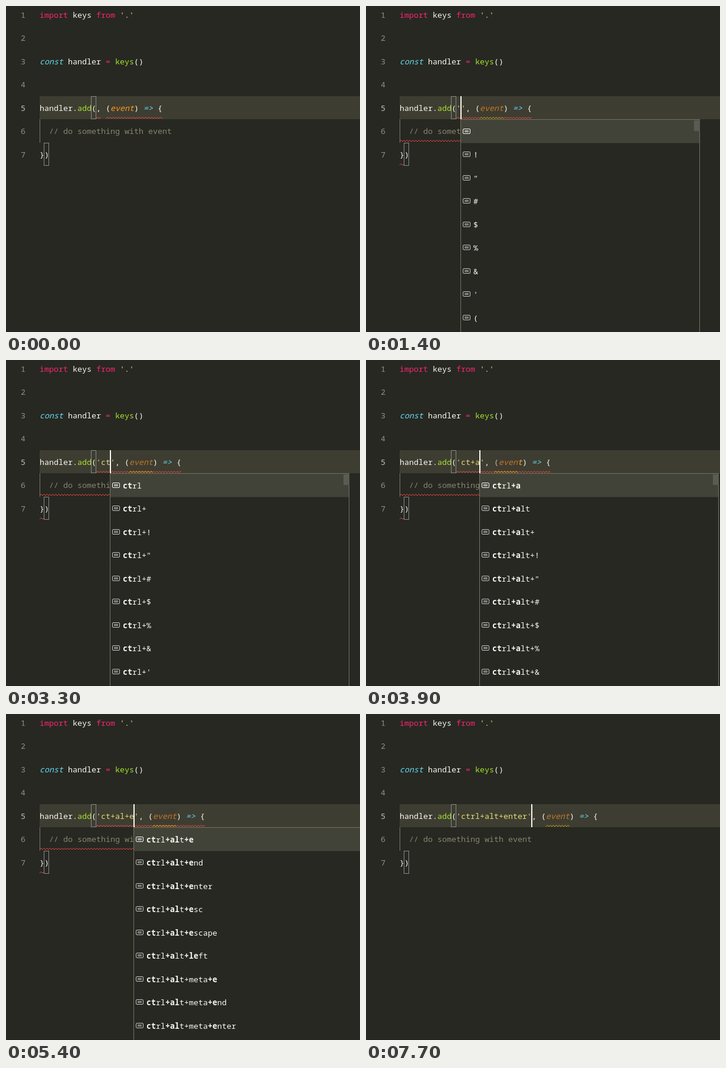
An HTML page with a canvas for the animation above (8 s loop, 600 px wide and 553 px high).

```html
<!DOCTYPE html>
<html lang="en">
<head>
<meta charset="utf-8">
<title>Typing with completions</title>
<style>
  html, body { margin: 0; height: 100%; overflow: hidden; background: #272822; }
  canvas { display: block; }
</style>
</head>
<body>
<canvas id="stage" width="600" height="553"></canvas>
<script>
const ctx = document.getElementById('stage').getContext('2d');
const LOOP = 8000, LEFT = 57, CHAR = 8, LINE = 39.5;
const FONT = '13.333px "Noto Sans Mono", monospace';
const BG = '#272822', ACTIVE = '#3e3d32', WHITE = '#f8f8f2', PINK = '#f92672', YELLOW = '#e6db74',
      GREEN = '#a6e22e', CYAN = '#66d9ef', ORANGE = '#fd971f', GREY = '#88846f',
      RED = '#f04a42', WARN = '#cca700';

// Asterisks toggle bold in completion labels.
const SYMBOLS = [...'!"#$%&\'('];
const complete = (prefix, endings) => endings.map(ending => prefix + ending);
const withSymbols = sep => SYMBOLS.map(s => sep + s);

const STATES = [
  { at: 0, key: null },
  { at: 400, key: '' },
  { at: 500, key: '', items: ['', ...SYMBOLS] },
  { at: 1900, key: 'c', items: complete('*c*', ['', 'apslock', 'lear', 'trl', 'trl+', ...withSymbols('trl+')]) },
  { at: 2300, key: 'ct', items: complete('*ct*rl', ['', '+', ...withSymbols('+')]) },
  { at: 3500, key: 'ct+', items: complete('*ct*rl*+*', ['', ...SYMBOLS]) },
  { at: 3800, key: 'ct+a', items: complete('*ct*rl*+a*', ['', 'lt', 'lt+', ...withSymbols('lt+')]) },
  { at: 4100, key: 'ct+al', items: complete('*ct*rl*+al*t', ['', '+', ...withSymbols('+')]) },
  { at: 4700, key: 'ct+al+', items: complete('*ct*rl*+al*t*+*', ['', ...SYMBOLS]) },
  { at: 5400, key: 'ct+al+e', items: [
    ...complete('*ct*rl*+al*t*+e*', ['', 'nd', 'nter', 'sc', 'scape']),
    '*ct*rl*+a*lt*+le*ft',
    ...complete('*ct*rl*+al*t+meta*+e*', ['', 'nd', 'nter'])] },
  { at: 5700, key: 'ct+al+en', items: [
    ...['', '+meta', '+shift', '+meta+shift'].flatMap(mod =>
      complete(`*ct*rl*+al*t${mod}*+en*`, ['d', 'ter'])),
    '*ct*rl*+al*t+m*e*ta*+n*'] },
  { at: 6900, key: 'ctrl+alt+enter' }
];
const CARET_OFF = [[0, 100], [900, 1300], [2700, 3300], [5100, 5400], [6200, 6700], [7350, 7700]];

const colX = col => LEFT + col * CHAR;
const lineTop = line => 153 + (line - 5) * LINE;

function box(color, x, y, w, h) {
  ctx.fillStyle = color;
  ctx.fillRect(x, y, w, h);
}

function text(str, x, baseline, color, style = '') {
  ctx.font = `${style} ${FONT}`;
  ctx.fillStyle = color;
  ctx.fillText(str, x, Math.floor(baseline));
}

// Parts are [string, color, style] runs laid out on the character grid.
function codeLine(line, parts) {
  let col = 0;
  for (const [str, color = WHITE, style] of parts) {
    text(str, colX(col), lineTop(line) + 25, color, style);
    col += str.length;
  }
}

function squiggle(line, col, length, color) {
  const x0 = colX(col), x1 = colX(col + length), y = Math.floor(lineTop(line)) + 36.8;
  ctx.save();
  ctx.beginPath();
  ctx.rect(x0, y - 3, x1 - x0, 6);
  ctx.clip();
  ctx.beginPath();
  for (let x = x0, up = 1; x <= x1 + 3; x += 2.5, up = -up) ctx.lineTo(x, y + up * 1.2);
  ctx.strokeStyle = color;
  ctx.lineWidth = 1;
  ctx.stroke();
  ctx.restore();
}

function bracketBox(line, col) {
  ctx.strokeStyle = '#888';
  ctx.lineWidth = 1;
  ctx.strokeRect(colX(col) - 0.5, Math.floor(lineTop(line)) + 0.5, CHAR, 38);
}

function icon(x, y, color) {
  ctx.strokeStyle = color;
  ctx.lineWidth = 1;
  ctx.beginPath();
  ctx.roundRect(x + 0.5, y + 0.5, 12, 8, 1.5);
  ctx.stroke();
  box(color, x + 3, y + 3, 7, 1);
  box(color, x + 3, y + 5, 7, 1);
}

function popup(x, items, selected) {
  const border = '#75715e';
  box(BG, x - 1, 192, 406, 361);
  box('#414339', x, 193 + selected * LINE, 405, LINE);
  box(border, x - 1, 192, 406, 1);
  box(border, x - 1, 192, 1, 361);
  box(border, x + 404, 192, 1, 361);
  box('#5a5b53', x + 395, 194, 10, 18);
  items.slice(0, 9).forEach((item, i) => {
    const y = 193 + i * LINE;
    icon(x + 3, Math.floor(y + 15), i === selected ? '#fff' : '#c5c5c5');
    let labelX = x + 21;
    item.split('*').forEach((run, j) => {
      text(run, labelX, y + 25, WHITE, j % 2 ? 'bold' : '');
      labelX += run.length * CHAR;
    });
  });
}

function draw(t) {
  const { key, items } = STATES.findLast(s => s.at <= t);
  const quoted = key === null ? '' : `'${key}'`;
  const after = 12 + quoted.length;
  const eventCol = after + 3;

  box(BG, 0, 0, 600, 553);
  box('#211f1c', 0, 552, 600, 1);
  box(ACTIVE, LEFT, 153, 543, 39);
  for (let n = 1; n <= 7; n++) text(n, 25, lineTop(n) + 25, n === 5 ? '#c2c2bf' : '#90908a');

  codeLine(1, [['import', PINK], [' keys '], ['from', PINK], [" '.'", YELLOW]]);
  codeLine(3, [['const', CYAN, 'italic'], [' handler '], ['= ', PINK], ['keys', GREEN], ['()']]);
  codeLine(5, [['handler.'], ['add', GREEN], ['('], [quoted, YELLOW], [', ('],
    ['event', ORANGE, 'italic'], [') '], ['=>', CYAN, 'italic'], [' {']]);
  codeLine(6, [['  // do something with event', GREY]]);
  codeLine(7, [['})']]);

  box('#767771', LEFT, 192, 1, 40);
  bracketBox(5, 11);
  bracketBox(7, 1);

  if (t < 600) {
    squiggle(5, after, 1, RED);
    squiggle(5, after + 2, 12, RED);
  } else if (t < 7300) {
    squiggle(5, 12, quoted.length + 14, RED);
    squiggle(6, 0, 28, RED);
    squiggle(7, 0, 1, RED);
  }
  if (t >= 700) {
    // The unused-variable hint trails one keystroke behind for a moment.
    const hintCol = eventCol - (t >= 3800 && t < 4100 ? 1 : 0);
    ctx.globalAlpha = 0.34;
    box(ACTIVE, colX(hintCol), 160, 5 * CHAR, 25);
    ctx.globalAlpha = 1;
    squiggle(5, hintCol, 5, WARN);
  }

  const caretCol = key === null ? 12 : after - (t < 6900 ? 1 : 0);
  if (items) popup(colX(caretCol), items, t >= 6500 ? 1 : 0);
  if (!CARET_OFF.some(([from, to]) => t >= from && t < to)) {
    box(WHITE, colX(caretCol) - 1, 153, 2, 39);
  }
}

const start = performance.now();
function tick() {
  draw((performance.now() - start) % LOOP);
  requestAnimationFrame(tick);
}
tick();
</script>
</body>
</html>
```
